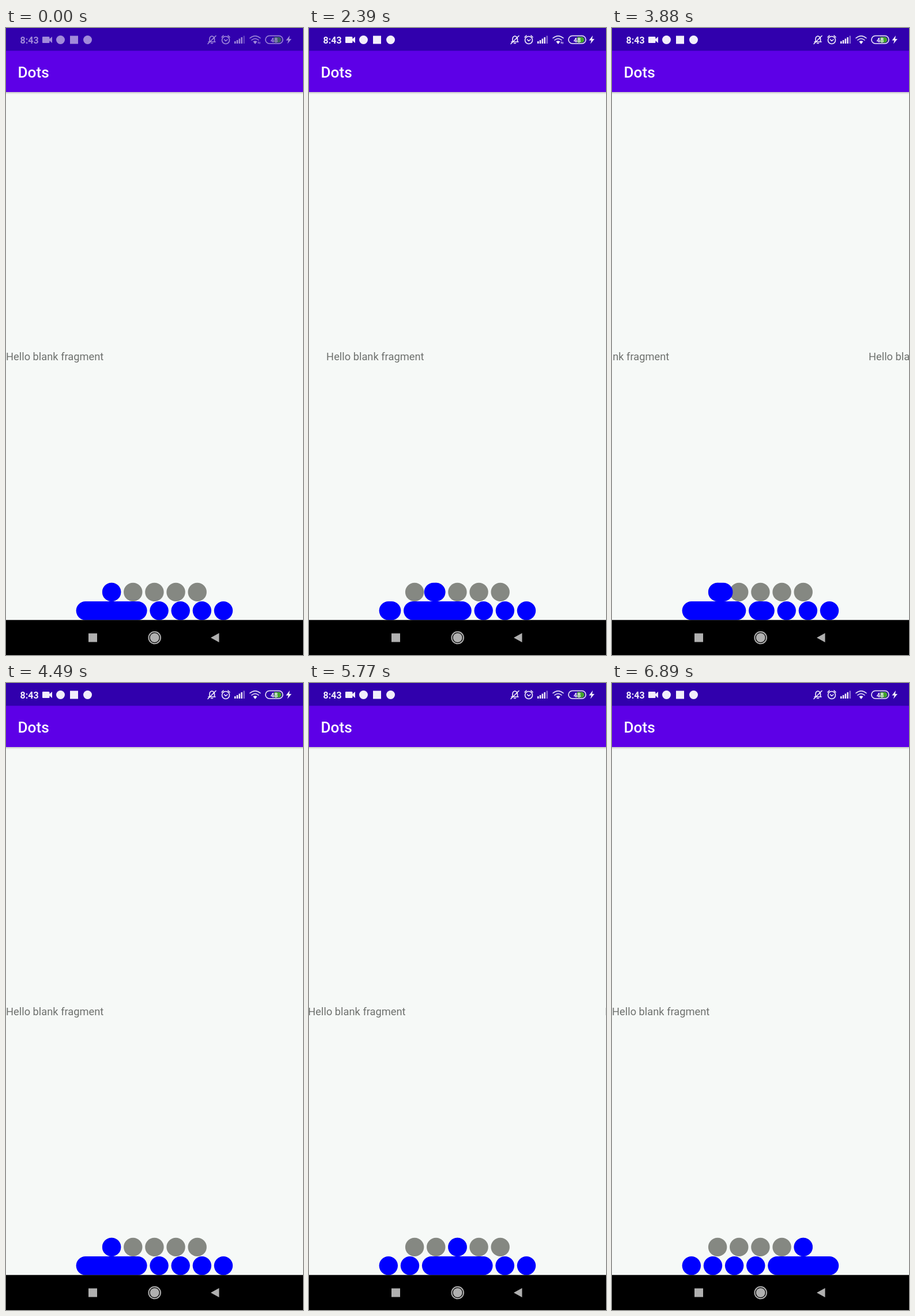
Write an HTML page that moves like this. It is 515x1087 px and loops after 6.93 s.

```html
<!DOCTYPE html>
<html lang="en">
<head>
<meta charset="utf-8">
<title>Dots</title>
<style>
  html, body { margin: 0; width: 100%; height: 100%; overflow: hidden; background: #f6f9f7; }
  svg { display: block; width: 515px; height: 1087px; font-family: Roboto, sans-serif; }
  .line { fill: none; stroke: #f2eefb; stroke-width: 1.6; stroke-linecap: round; stroke-linejoin: round; }
</style>
</head>
<body>
<svg viewBox="0 0 515 1087">
  <defs>
    <linearGradient id="shadow" x2="0" y2="1">
      <stop stop-color="#000" stop-opacity=".2"/>
      <stop offset="1" stop-color="#000" stop-opacity="0"/>
    </linearGradient>
  </defs>
  <rect width="515" height="1087" fill="#f6f9f7"/>
  <g id="pages" font-size="18.3" fill="#6e716e"></g>
  <rect y="111" width="515" height="4" fill="url(#shadow)"/>
  <rect y="39" width="515" height="72" fill="#5d00e7"/>
  <text x="20.5" y="85.5" font-size="26.2" font-weight="500" fill="#fff">Dots</text>
  <rect width="515" height="39.5" fill="#3100ad"/>

  <g id="status" fill="#f2eefb">
    <text x="24.5" y="26.5" font-size="16" font-weight="700">8:43</text>
    <path d="M64 15h10q1.500 0 1.500 1.500v2.500l4.500-4v11l-4.500-4v2.500q0 1.500-1.500 1.500H64q-1 0-1-1V16q0-1 1-1z"/>
    <circle cx="94.500" cy="20.500" r="7.500"/>
    <rect x="111" y="13.500" width="14" height="14"/>
    <circle cx="141.500" cy="20.500" r="7.500"/>
    <g class="line">
      <path d="M351 24h12M353 23v-4q0-4 4-5q4 1 4.500 5v4M355.500 26.500h3M350 27.500L364 13.500"/>
      <circle cx="381" cy="21" r="6.500"/>
      <path d="M374 16l3-3M388 16l-3-3M378.500 20l2.500 2.500l3-2.500"/>
    </g>
    <path d="M396 23h2.500v4H396zM399.800 21h2.500v6h-2.500zM403.600 18.500h2.500v8.500h-2.500zM407.400 16h2.500v11h-2.500z"/>
    <path d="M411.500 13.500h2.500V27h-2.500z" opacity=".45"/>
    <path class="line" stroke-width="2" d="M423 17.500q9-7.500 18 0M426 21q6-5 12 0"/>
    <path d="M428.500 23.500q3.500-2.500 7 0L432 28z"/>
    <path id="arrows" d="M437.500 27v-3.500M440 24v3.500" stroke="#f2eefb" stroke-width="1.2"/>
    <path d="M465 15.500h7.500a5 5 0 0 1 0 10H465z" fill="#43a52c"/>
    <rect class="line" x="450" y="13.500" width="30" height="13.500" rx="6.700" stroke-width="1.500"/>
    <text x="465" y="24.500" font-size="11" font-weight="700" text-anchor="middle">48</text>
    <path d="M492 13l-6.500 8.500h4L488 27.500l7-8.500h-4z"/>
  </g>

  <g id="dots"></g>

  <rect y="1026.300" width="515" height="61" fill="#000"/>
  <g fill="#b0b0b0">
    <rect x="143" y="1049.500" width="15" height="15"/>
    <circle cx="257.700" cy="1057" r="8"/>
    <circle cx="257.700" cy="1057" r="10.300" fill="none" stroke="#b0b0b0" stroke-width="2"/>
    <path d="M355 1057l14.500-8v16z"/>
  </g>
</svg>
<script>
const LOOP = 6930, WIDTH = 515, COUNT = 5;
const SIZE = 32.4, GAP = 4.75, STEP = SIZE + GAP, GROWTH = 90.6;
const ROW_X = 166.9, WIDE_X = 121.6, ROW_Y = 961.7, WIDE_Y = 994;
const BLUE = '#0000ff', GRAY = '#858882';

// Each swipe: start time, end time, starting page, final page.
const swipes = [
  [1480, 2548, 0, 1], [2600, 4267, 1, 0],
  [4510, 5070, 0, 1], [5120, 5720, 1, 2],
  [5752, 6312, 2, 3], [6340, 6870, 3, 4]
];

const clamp = v => Math.max(0, Math.min(1, v));
const smooth = v => v * v * (3 - 2 * v);
const byId = id => document.getElementById(id);

function add(parent, tag, attrs) {
  const node = document.createElementNS(parent.namespaceURI, tag);
  setAttrs(node, attrs);
  return parent.appendChild(node);
}

function setAttrs(node, attrs) {
  for (const name in attrs) node.setAttribute(name, attrs[name]);
}

function pill(x, y, fill) {
  return add(byId('dots'), 'rect', { x, y, width: SIZE, height: SIZE, rx: SIZE / 2, fill });
}

const indexes = [...Array(COUNT).keys()];
indexes.forEach(i => pill(ROW_X + i * STEP, ROW_Y, GRAY));
const worm = pill(ROW_X, ROW_Y, BLUE);
const wide = indexes.map(() => pill(WIDE_X, WIDE_Y, BLUE));
indexes.forEach(i => {
  add(byId('pages'), 'text', { x: i * WIDTH, y: 576 }).textContent = 'Hello blank fragment';
});

function pageAt(time) {
  return swipes.reduce((page, [start, end, from, to]) =>
    time < start ? page : from + (to - from) * smooth(clamp((time - start) / (end - start))), 0);
}

function draw(time) {
  const page = pageAt(time);
  byId('pages').setAttribute('transform', `translate(${-page * WIDTH} 0)`);

  // The leading edge travels first, then the trailing edge catches up.
  const base = Math.floor(page), part = page - base;
  const head = clamp(part * 2), tail = clamp(part * 2 - 1);
  setAttrs(worm, { x: ROW_X + (base + tail) * STEP, width: SIZE + (head - tail) * STEP });

  let x = WIDE_X;
  wide.forEach((dot, i) => {
    const width = SIZE + GROWTH * clamp(1 - Math.abs(i - page));
    setAttrs(dot, { x, width });
    x += width + GAP;
  });

  byId('status').setAttribute('opacity', 0.58 + 0.42 * clamp((time - 540) / 450));
  byId('arrows').setAttribute('opacity', time < 3000 ? 1 : 0);
}

const begin = performance.now();
function tick() {
  draw((performance.now() - begin) % LOOP);
  requestAnimationFrame(tick);
}
tick();
</script>
</body>
</html>
```
